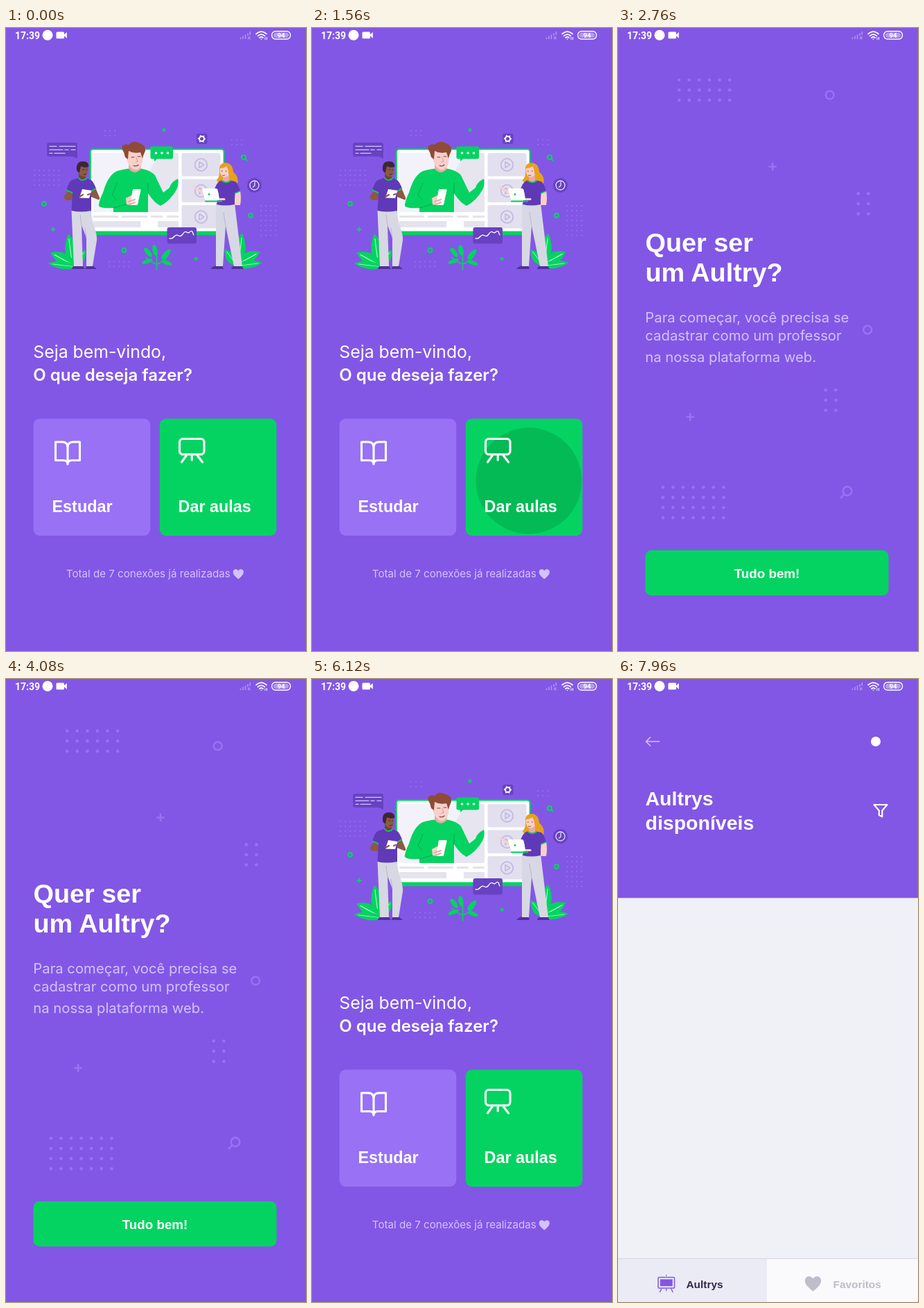
Animation, 433 px wide and 897 px high, one loop 8000 ms. Source, as an HTML page:

```html
<!DOCTYPE html>
<html lang="pt-BR">
<head>
<meta charset="utf-8">
<title>Boas-vindas</title>
<style>
@property --teach { syntax: "<number>"; inherits: true; initial-value: 0; }
@property --study { syntax: "<number>"; inherits: true; initial-value: 0; }

html, body { margin: 0; width: 100%; height: 100%; overflow: hidden; background: #8257e5; }
svg { display: block; position: absolute; left: 0; top: 0; }

#stage {
  position: absolute; left: 0; top: 0; width: 433px; height: 897px;
  overflow: hidden; background: #8257e5;
  animation: teach 8s infinite, study 8s infinite;
  animation-timing-function: cubic-bezier(.35, .45, 0, 1);
}
@keyframes teach {
  0%, 19.6% { --teach: 0; }
  24.91%, 67.49% { --teach: 1; }
  72.8%, 100% { --teach: 0; }
}
@keyframes study {
  0%, 83.17% { --study: 0; }
  88.48%, 100% { --study: 1; }
}

/* Each sheet is unveiled from the bottom while its content barely moves. */
.layer { position: absolute; left: 0; top: 27px; width: 433px; height: 870px; overflow: hidden; }
#home { --p: calc(var(--teach) + var(--study)); }
#home svg { transform: translateY(calc(var(--p) * -2%)); }
#shade { position: absolute; inset: 0; background: #000; opacity: calc(min(1, var(--p) / .36) * .1); }
#teach { --p: var(--teach); }
#study { --p: var(--study); }
.sheet { transform: translateY(calc((1 - var(--p)) * 100%)); }
.sheet svg { transform: translateY(calc((1 - var(--p)) * -95.9%)); }

.ripple { opacity: 0; animation: ripple 8s var(--at) infinite cubic-bezier(.4, 0, .2, 1); }
@keyframes ripple {
  0% { r: var(--r0); transform: translate(var(--dx), var(--dy)); opacity: 0; }
  .6% { opacity: .12; }
  2.8%, 100% { r: var(--r1); transform: translate(0, 0); }
  4% { opacity: .12; }
  6.5%, 100% { opacity: 0; }
}

.body { font-family: Inter, Roboto, sans-serif; }
.head { font-family: "Liberation Sans", Arial, sans-serif; font-weight: 700; }
.bar { font-family: Roboto, sans-serif; }
.line { fill: none; stroke-linecap: round; stroke-linejoin: round; }
</style>
</head>
<body>
<div id="stage">

<div id="home" class="layer">
<svg width="433" height="870" viewBox="0 27 433 870">
  <defs>
    <clipPath id="cardL"><rect x="39.6" y="562.4" width="168.6" height="168.6" rx="9"/></clipPath>
    <clipPath id="cardR"><rect x="221.8" y="562.4" width="168.6" height="168.6" rx="9"/></clipPath>
    <clipPath id="screen"><rect x="126" y="180" width="123" height="85" rx="2"/></clipPath>
    <g id="leaf">
      <path d="M0 0C-9-7-10-20-1-32C9-22 10-8 0 0Z"/>
      <path d="M0 0Q-1-14-1-27" class="line" stroke="#c9f7dc" stroke-width=".9"/>
    </g>
    <g id="bush" fill="#04d361">
      <use href="#leaf" transform="translate(96 341) rotate(-6) scale(1.15 1.4)"/>
      <use href="#leaf" transform="translate(101 343) rotate(-60) scale(1.2 1.3)"/>
      <use href="#leaf" transform="translate(102 344) rotate(-82) scale(.8 1.3)"/>
      <use href="#leaf" transform="translate(98 343) rotate(38) scale(.9)"/>
    </g>
    <g id="play">
      <rect x="-28" y="-17" width="56" height="33.5" rx="3" fill="#e2e0ee"/>
      <circle r="8.8" class="line" stroke="#c4b8e4" stroke-width="1.8"/>
      <path d="M-2.5-4.2L4.2 0L-2.5 4.2Z" class="line" stroke="#c4b8e4" stroke-width="1.6"/>
    </g>
    <path id="heart" d="M0 7.2C-4 3.6-7.6 1-7.6-3C-7.6-7.6-2-8.6 0-4.8C2-8.6 7.6-7.6 7.6-3C7.6 1 4 3.6 0 7.2Z"/>
  </defs>

  <g id="homeDots" fill="#9871f5"></g>

  <!-- small ornaments -->
  <g class="line" stroke="#04d361" stroke-width="2.2">
    <circle cx="55" cy="253" r="2.8"/><circle cx="353" cy="270" r="2.8"/>
    <circle cx="170.5" cy="320" r="2.8"/><circle cx="343" cy="186" r="3"/>
    <path d="M345.5 188.5L347.5 190.5M65.5 290H70.5M68 287.5V292.5M226.5 145.5L229.5 148.5M229.5 145.5L226.5 148.5M272.8 331L275.5 333.5M275.5 331L272.8 333.5"/>
  </g>
  <g fill="#6842c2">
    <path d="M62 165H100Q103 165 103 168V188L96 185H62Q59 185 59 182V168Q59 165 62 165Z"/>
    <rect x="275" y="152" width="15.5" height="15" rx="3"/>
    <circle cx="358.5" cy="226.5" r="10.5"/>
  </g>
  <path d="M63 170.3H73M77 170.3H100M63 175.3H82M85 175.3H90M94 175.3H100M63 180.3H67M70 180.3H85" class="line" stroke="#d4c2ff" stroke-width="1.3"/>
  <circle cx="282.5" cy="159.5" r="3.5" class="line" stroke="#fff" stroke-width="2"/>
  <circle cx="282.5" cy="159.5" r="5" class="line" stroke="#fff" stroke-width="1.6" stroke-dasharray=".1 5.136"/>
  <g class="line" stroke="#e9e0ff" stroke-width="1.3"><circle cx="358.5" cy="226.5" r="6.5"/><path d="M359 222V227L356.5 229"/></g>

  <use href="#bush"/>
  <use href="#bush" transform="matrix(-1 0 0 1 431 -1)"/>

  <!-- monitor -->
  <rect x="120.8" y="173.6" width="194.8" height="124.7" rx="4.5" fill="#04d361"/>
  <rect x="122.8" y="175.6" width="190.8" height="117" rx="3" fill="#fff"/>
  <g clip-path="url(#screen)">
    <rect x="126" y="180" width="123" height="85" fill="#e6e5f0"/>
    <path d="M126 180H222L171 265H126Z" fill="#f3f2fa"/>
  </g>
  <path d="M126 271.5H162M167 271.5H204M209 271.5H226M232 271.5H249" stroke="#e4e3ee" stroke-width="3"/>
  <path d="M126 282.5H194M219 282.5H249" stroke="#e4e3ee" stroke-width="9"/>
  <use href="#play" x="281.5" y="197"/><use href="#play" x="281.5" y="234.5"/><use href="#play" x="281.5" y="272"/>

  <!-- teacher on the screen -->
  <path d="M177 196H194L195 206Q186 214 177 205Z" fill="#e9aaa6"/>
  <path d="M173 179Q184 173 196 179Q199 190 195 199Q190 207 183 203Q174 197 173 179Z" fill="#f8d0cb"/>
  <path d="M167.500 174Q167 166 177 168Q184 161 192 165.500Q202 168 201 177Q198 183 197 188L194 179Q184 181 177 177L176 189L172 186Q171 180 167.500 174Z" fill="#8e4b37"/>
  <path d="M181 186H185M190 185H194M184 198Q188 200 191 197" class="line" stroke="#7b4036" stroke-width="1.1"/>
  <path d="M188 187L190 192L187 193" class="line" stroke="#dd8f8c" stroke-width=".9"/>
  <path d="M134 254Q135 247 140 237Q147 212 160 206Q170 203 177 202.500Q186 213 195 202.500Q209 205 215 212L227 237L236 230Q238 222 248 217Q250 225 246 233Q237 249 223 256Q214 252 205 238V265H155V259Q142 260 137 258Q133 257 134 254Z" fill="#04d361"/>
  <path d="M160 223Q157 232 153 240L159 247M205 223V238M155 259L177 253" class="line" stroke="#03aa4e" stroke-width="1"/>
  <path d="M173 245L181 241Q190 244 191 252Q184 256 174 254Z" fill="#f8d0cb"/>
  <path d="M184 232H193Q195 232 194.5 234L190 254Q190 255 188 255H181Q179 255 179.5 253L182.5 234Q183 232 184 232Z" fill="#fff"/>
  <path d="M177 250L186 247M178 254L186 251" class="line" stroke="#e9aaa6" stroke-width="2"/>
  <path d="M211 170.5H238.5Q241 170.5 241 173V186Q241 188.5 238.5 188.5H218L214 192V188.5H211Q208.5 188.5 208.5 186V173Q208.5 170.5 211 170.5Z" fill="#04d361"/>
  <path d="M216.5 180H216.51M225 180H225.01M233.5 180H233.51" class="line" stroke="#fff" stroke-width="3.6"/>

  <!-- chart card and middle plant -->
  <rect x="232.5" y="287" width="42.5" height="23.5" rx="3" fill="#6842c2"/>
  <path d="M236 303Q240 304 243 300Q246 297 249 299Q252 301 255 297Q258 292 261 294Q264 296 266 293Q269 291 270 296L271 298" class="line" stroke="#fff" stroke-width="1.3"/>
  <g fill="#04d361">
    <path d="M217.5 348V320M217.5 340Q208 337 202 330M217.5 340Q227 337 233 329" class="line" stroke="#04d361" stroke-width="1.6"/>
    <ellipse cx="215" cy="320" rx="3.6" ry="8" transform="rotate(-12 215 320)"/>
    <ellipse cx="205" cy="323" rx="3.4" ry="8" transform="rotate(-40 205 323)"/>
    <ellipse cx="231" cy="326" rx="3.6" ry="9" transform="rotate(42 231 326)"/>
    <ellipse cx="204" cy="336" rx="3" ry="8" transform="rotate(70 204 336)"/>
    <ellipse cx="232" cy="338" rx="3" ry="8" transform="rotate(-70 232 338)"/>
  </g>

  <!-- left student -->
  <path d="M95 347Q96 342 101 342H110L114 347ZM115 347Q115 342 120 342H125L131 347Z" fill="#50309a"/>
  <path d="M94.5 262H122L126 283Q132 298 131 306L125 343H116L116 302L109 284L111 343H98Z" fill="#d8d7e4"/>
  <path d="M109 284L107 269M116 302L114 288" class="line" stroke="#b9b6cd" stroke-width="1"/>
  <path d="M105 208H114L116 219Q110 224 105 218Z" fill="#70452f"/>
  <path d="M104 197H117Q120 206 116 213Q111 216 106 211Z" fill="#8b5a42"/>
  <path d="M102 204Q101 192 111 192Q120 192 119 200Q113 202 108 199L106 208Q103 208 102 204Z" fill="#3b2635"/>
  <path d="M111 204H113M116 204H117M112 211Q114 212 116 210" class="line" stroke="#3b2635" stroke-width=".9"/>
  <path d="M88 236L96 235L94 239L108 238L110 244L93 248Q82 248 84 242ZM123 233L129 230L135 244Q136 249 130 246L118 241Z" fill="#8b5a42"/>
  <path d="M105 215.5Q110 221 116 216L123 219Q126 221 130 231L123 235V263Q108 266 94.5 263L96 237L87 234Q90 222 95 219Z" fill="#6039b8"/>
  <path d="M105 216Q110 222 116 216.5M87.5 233.5L95.5 237M124 234.5L129.5 231" class="line" stroke="#04d361" stroke-width="1.7"/>
  <path d="M110 232L123.5 234L120 245L106 244.5Z" fill="#fff"/>
  <path d="M106 243L111 240M118 240L121 239" class="line" stroke="#8b5a42" stroke-width="2.2"/>

  <!-- right student -->
  <path d="M295 347Q298 343 304 342H312L314 347ZM325 347Q326 342 332 342H340L343 347Z" fill="#50309a"/>
  <path d="M303 252H330L341 343H329L317 285L313 343H303Z" fill="#d8d7e4"/>
  <path d="M317 285L314 266" class="line" stroke="#b9b6cd" stroke-width="1"/>
  <path d="M308 205Q307 194 318 194Q327 195 328 207Q337 215 334 224Q327 231 319 227Q307 228 304 219Q309 214 308 205Z" fill="#e8a11c"/>
  <path d="M313 210H322V219Q318 225 313 218Z" fill="#e9aaa6"/>
  <path d="M309 202Q315 202 318 199Q322 205 321 212Q316 217 311 213Q308 208 309 202Z" fill="#f8d0cb"/>
  <path d="M311 206H312.5M317 206H318.5M312 212Q314 213.5 316 212" class="line" stroke="#8e4b37" stroke-width=".9"/>
  <path d="M331 235L338 234Q340 246 338 255L332 255L309 248L310 243L330 247ZM282 234L268 226L272 231L283 239L303 242L304 236Z" fill="#f8d0cb"/>
  <path d="M311 219Q317 224 324 219.5L331 221Q335 224 338 235L330 238V254Q316 257 304 254L307 238L301 232Q304 222 311 219Z" fill="#6039b8"/>
  <path d="M311 219.5Q317 225 324 220M330.5 238L337.5 235" class="line" stroke="#04d361" stroke-width="1.6"/>
  <path d="M284 231H303Q305 231 305.5 233L308.5 248H287.5L283 233Q282.5 231 284 231Z" fill="#fff"/>
  <path d="M288 249.5H311" class="line" stroke="#04d361" stroke-width="2"/>
  <circle cx="293" cy="239.5" r="1.4" fill="#04d361"/>
  <path d="M309 246.5H315" class="line" stroke="#f8d0cb" stroke-width="3"/>

  <g fill="#fff">
    <text class="body" x="39.3" y="474.5" font-size="24.8">Seja bem-vindo,</text>
    <text class="body" x="39.3" y="507.5" font-size="24" font-weight="600">O que deseja fazer?</text>
  </g>

  <g clip-path="url(#cardL)">
    <rect x="39" y="562" width="170" height="170" fill="#9871f5"/>
    <circle class="ripple" cx="124" cy="647" style="--at:6480ms;--r0:50px;--r1:120px;--dx:8px;--dy:6px"/>
  </g>
  <g clip-path="url(#cardR)">
    <rect x="221" y="562" width="170" height="170" fill="#04d361"/>
    <circle class="ripple" cx="306" cy="647" style="--at:1493ms;--r0:50px;--r1:120px;--dx:11px;--dy:8px"/>
  </g>
  <g class="line" stroke="#fff" stroke-width="3.1">
    <path d="M71.5 596H81Q89 596 89 604V628Q89 622.5 83 622.5H71.5ZM106.5 596H97Q89 596 89 604V628Q89 622.5 95 622.5H106.5Z"/>
    <rect x="250.5" y="591.5" width="35.5" height="22.5" rx="5"/>
    <path d="M260 616L253.5 625M268.2 616V622M276.5 616L283.5 625"/>
  </g>
  <g class="head" fill="#fff" font-size="23.4">
    <text x="66.5" y="697">Estudar</text>
    <text x="248.5" y="697">Dar aulas</text>
  </g>
  <text class="body" x="86.8" y="791" font-size="15.15" fill="#d4c2ff">Total de 7 conexões já realizadas</text>
  <use href="#heart" x="335.3" y="786.3" fill="#d4c2ff"/>
</svg>
<div id="shade"></div>
</div>

<div id="teach" class="layer sheet">
<svg width="433" height="870" viewBox="0 27 433 870">
  <clipPath id="okClip"><rect x="39.5" y="752" width="351" height="65" rx="8.5"/></clipPath>
  <rect y="27" width="433" height="870" fill="#8257e5"/>
  <g id="teachDots" fill="#9871f5"></g>
  <g fill="none" stroke="#9871f5" stroke-width="2.6">
    <circle cx="305.7" cy="96.5" r="5.9"/>
    <circle cx="360.2" cy="434.5" r="5.9"/>
    <circle cx="331" cy="666.7" r="6.3"/>
    <path d="M326.5 671.5L321 677M217.3 199.5H228.9M223.1 193.7V205.3M98.3 560H109.9M104.1 554.2V565.8"/>
  </g>
  <g class="head" fill="#fff" font-size="37.8">
    <text x="39.5" y="322">Quer ser</text>
    <text x="39.5" y="365.3">um Aultry?</text>
  </g>
  <g class="body" fill="#d4c2ff" font-size="20.3">
    <text x="39.3" y="423.5">Para começar, você precisa se</text>
    <text x="39.3" y="450">cadastrar como um professor</text>
    <text x="39.3" y="481">na nossa plataforma web.</text>
  </g>
  <g clip-path="url(#okClip)">
    <rect x="39" y="752" width="352" height="65" fill="#04d361"/>
    <circle class="ripple" cx="215" cy="784.5" style="--at:5265ms;--r0:105px;--r1:180px;--dx:16px;--dy:4px"/>
  </g>
  <text class="head" x="215" y="791.5" font-size="18.8" fill="#fff" text-anchor="middle">Tudo bem!</text>
</svg>
</div>

<div id="study" class="layer sheet">
<svg width="433" height="870" viewBox="0 27 433 870">
  <rect y="27" width="433" height="870" fill="#f0f0f7"/>
  <rect y="27" width="433" height="288.3" fill="#8257e5"/>
  <path d="M59.5 90H41M46.5 84L40.5 90L46.5 96" class="line" stroke="#d4c2ff" stroke-width="1.7"/>
  <circle cx="372" cy="90" r="7" fill="#fff"/>
  <g class="head" fill="#fff" font-size="28.5">
    <text x="39.5" y="182">Aultrys</text>
    <text x="39.5" y="217">disponíveis</text>
  </g>
  <path d="M369.5 181H388.5L381.3 189.5V198.3L376.8 196V189.5Z" class="line" stroke="#fff" stroke-width="2.2"/>

  <rect y="834" width="215" height="63" fill="#ebebf5"/>
  <rect x="215" y="834" width="218" height="63" fill="#fafafc"/>
  <rect y="834" width="433" height="1" fill="#d6d5e2"/>
  <g fill="#8257e5" stroke="#8257e5" stroke-width="1.5" stroke-linecap="round">
    <rect x="58" y="861.5" width="23.5" height="15.5" rx="1" fill="none"/>
    <rect x="60.8" y="864.3" width="17.9" height="9.9" stroke="none"/>
    <path d="M69.7 858.5V859M62.5 878.5L60.5 882.5M69.7 878.5V880.5M77 878.5L79 882.5" fill="none"/>
  </g>
  <use href="#heart" transform="translate(281.5 870.8) scale(1.53)" fill="#c1bccc"/>
  <g class="head" font-size="15.4">
    <text x="98.5" y="876.7" fill="#32264d">Aultrys</text>
    <text x="310.5" y="876.7" fill="#c1bccc">Favoritos</text>
  </g>
</svg>
</div>

<svg width="433" height="27">
  <rect width="433" height="27" fill="#8257e5"/>
  <g fill="#fff">
    <text class="bar" x="13" y="15.5" font-size="14" font-weight="600">17:39</text>
    <circle cx="60" cy="10.3" r="7.5"/>
    <rect x="72.5" y="5.5" width="11.5" height="9.8" rx="1.5"/>
    <path d="M83 10.3L87.8 6V14.8Z"/>
  </g>
  <path d="M338.5 16V13.5M342 16V11.5M345.5 16V9.5M349 11V7.5M352.3 10V5M349 12.5L352.5 16M352.5 12.5L349 16" stroke="#b296f1" stroke-width="1.5"/>
  <g class="line" stroke="#fff" stroke-width="1.7">
    <path d="M361 8.5Q368.5 1.7 376 8.5M363.5 11.3Q368.5 6.8 373.5 11.3M366 14Q368.5 11.7 371 14M368.5 16V16.01"/>
    <path d="M374 13.5V16.5M376.5 13.5V16.5" stroke-width="1"/>
  </g>
  <rect x="383.7" y="4.7" width="26.8" height="11.3" rx="5.3" fill="none" stroke="#fff" stroke-width="1.4"/>
  <rect x="386" y="6.7" width="22" height="7.3" rx="3.5" fill="#b59bf0"/>
  <text class="bar" x="397" y="13.8" font-size="9.8" font-weight="700" fill="#fff" text-anchor="middle">94</text>
</svg>
</div>

<script>
function dots(id, r, step, grids) {
  const group = document.getElementById(id);
  for (const [x, y, cols, rows] of grids) {
    for (let i = 0; i < cols * rows; i++) {
      const dot = document.createElementNS(group.namespaceURI, "circle");
      dot.setAttribute("cx", x + (i % cols) * step);
      dot.setAttribute("cy", y + Math.floor(i / cols) * step);
      dot.setAttribute("r", r);
      group.append(dot);
    }
  }
}
dots("homeDots", 1, 7.1, [
  [41, 205, 6, 4], [143, 148, 3, 2], [326, 161, 3, 2], [368, 256, 4, 7], [149, 336.5, 5, 2],
]);
dots("teachDots", 2.3, 14.6, [
  [88.2, 74.7, 6, 3], [346.8, 238.4, 2, 3], [299.8, 521.3, 2, 3], [64.8, 661.3, 7, 4],
]);
</script>
</body>
</html>
```
